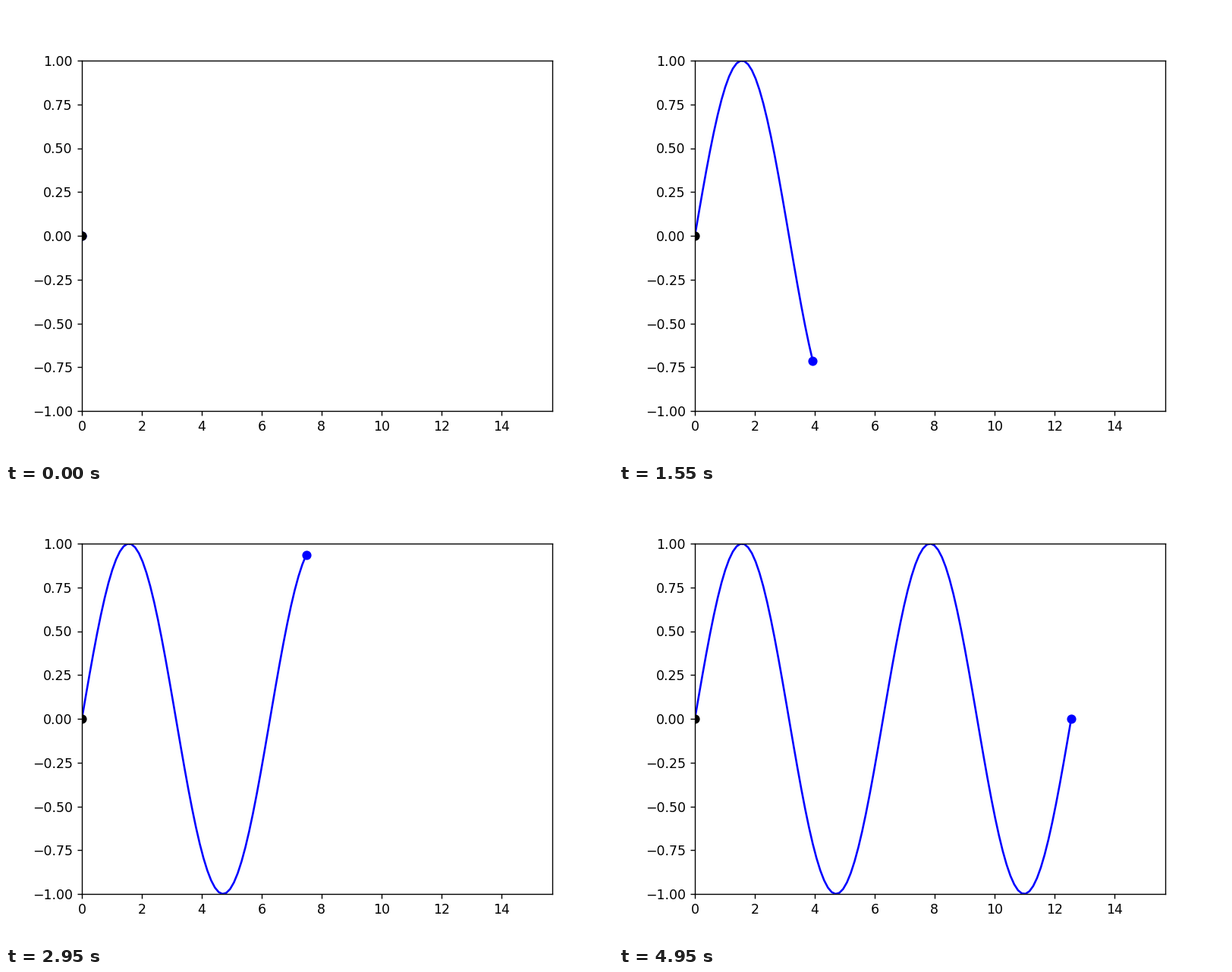
Recreate the animation shown at these times as a matplotlib script. Size 800 by 600 pixels, loop 5 s.

```python
import numpy as np
import matplotlib.pyplot as plt
from matplotlib.animation import FuncAnimation

FRAMES = 100
INTERVAL = 50  # ms

x = np.linspace(0, 4 * np.pi, FRAMES)
y = np.sin(x)

fig, ax = plt.subplots(figsize=(6.4, 4.8), dpi=125)
ax.set_xlim(0, 5 * np.pi)
ax.set_ylim(-1, 1)

curve, = ax.plot([], [], "b-")
head, = ax.plot([], [], "bo")
ax.plot(0, 0, "ko")  # start point stays on top of the moving head


def update(i):
    curve.set_data(x[:i + 1], y[:i + 1])
    head.set_data(x[i:i + 1], y[i:i + 1])
    return curve, head


anim = FuncAnimation(fig, update, frames=FRAMES, interval=INTERVAL,
                     repeat=True, repeat_delay=0)
plt.show()
```
